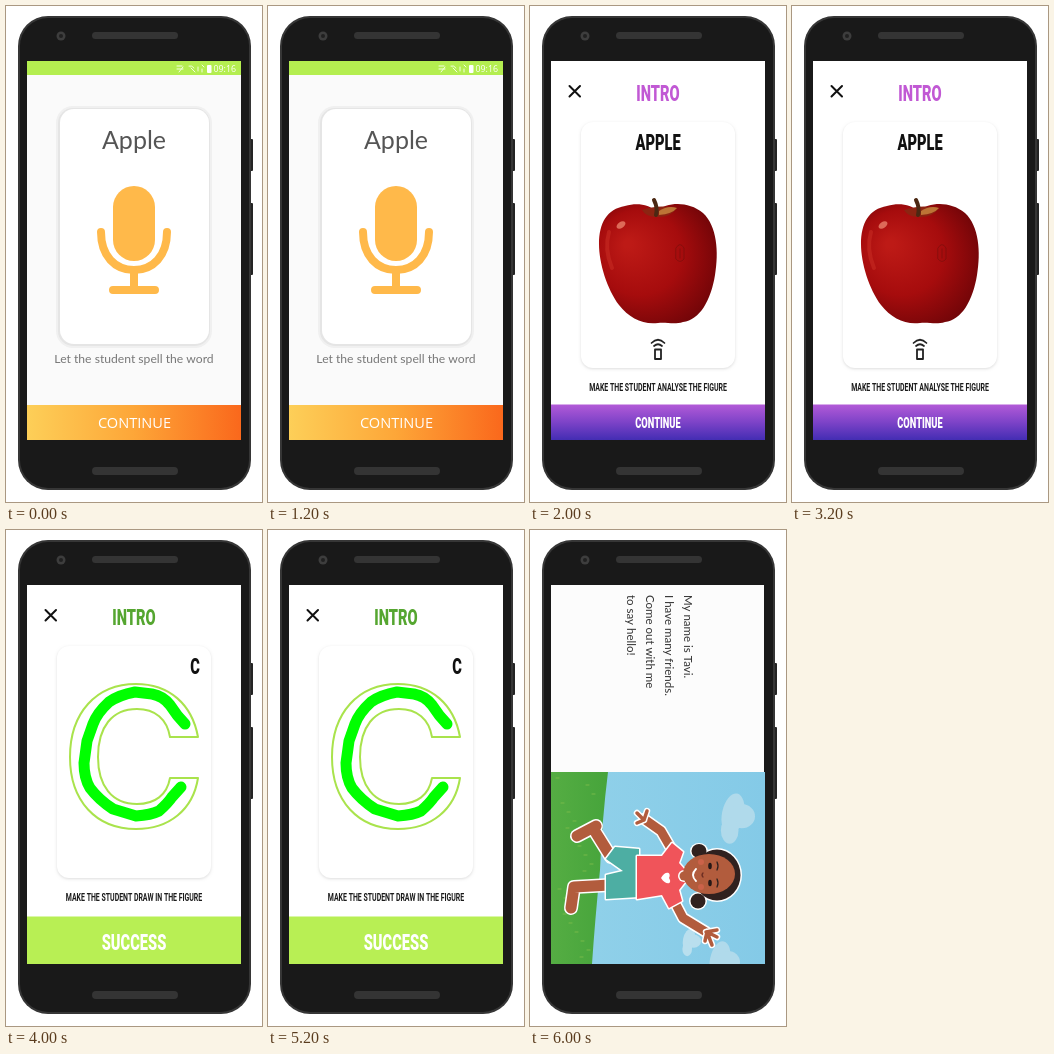
Animation, 256 px wide and 496 px high, one loop 8 s. Source, as an HTML page with a canvas:

```html
<!DOCTYPE html>
<html lang="en">
<head>
<meta charset="utf-8">
<title>Learning app screens</title>
<style>
html, body { margin: 0; width: 100%; height: 100%; overflow: hidden; background: #fff; }
canvas { display: block; width: 256px; height: 496px; }
</style>
</head>
<body>
<canvas id="stage" width="256" height="496"></canvas>
<script>
const c = document.getElementById('stage').getContext('2d');
const SANS = 'Lato, "Open Sans", sans-serif';
const CONDENSE = 0.65; // narrow poster lettering
const SKIN = '#b25c3d', HAIR = '#30211f';

function box(x, y, w, h, fill, r = 0) {
  c.beginPath();
  c.roundRect(x, y, w, h, r);
  c.fillStyle = fill;
  c.fill();
}

function oval(x, y, rx, ry, fill, turn = 0) {
  c.beginPath();
  c.ellipse(x, y, rx, ry, turn, 0, 7);
  c.fillStyle = fill;
  c.fill();
}

function line(d, color, width) {
  c.strokeStyle = color;
  c.lineWidth = width;
  c.lineCap = c.lineJoin = 'round';
  c.stroke(new Path2D(d));
}

function shape(d, fill, edge) {
  if (edge) line(d, edge, 3);
  c.fillStyle = fill;
  c.fill(new Path2D(d));
}

function text(s, x, y, font, color, align = 'center') {
  c.font = font;
  c.fillStyle = color;
  c.textAlign = align;
  c.fillText(s, x, y);
}

function poster(s, x, y, size, color, weight = 900) {
  c.save();
  c.translate(x, y);
  c.scale(CONDENSE, 1);
  text(s, 0, 0, `${weight} ${size}px Roboto, sans-serif`, color);
  c.restore();
}

function blend(x0, y0, x1, y1, ...colors) {
  const g = c.createLinearGradient(x0, y0, x1, y1);
  colors.forEach((k, i) => g.addColorStop(i / (colors.length - 1), k));
  return g;
}

function card(x, y, w, h, r) {
  c.save();
  c.shadowColor = '#0002';
  c.shadowBlur = 3;
  c.shadowOffsetY = 1;
  box(x, y, w, h, '#fff', r);
  c.restore();
}

function phone() {
  box(243, 133, 4, 32, '#242424', 1);
  box(243, 197, 4, 72, '#242424', 1);
  box(12, 10, 233, 474, '#363636', 30);
  box(14, 12, 229, 470, '#191919', 28);
  box(86, 26, 86, 7, '#343434', 3.5);
  box(86, 461, 86, 8, '#343434', 4);
  oval(55, 30, 4.5, 4.5, '#3d3d3d');
  oval(55, 30, 2, 2, '#202020');
}

function spell() {
  box(21, 55, 214, 379, '#fafafa');
  box(21, 55, 214, 14, '#b4ee50');
  text('09:16', 230, 66, '8.8px "Open Sans", sans-serif', '#fff', 'right');
  box(201, 59, 4.5, 8, '#fff', 1);
  line('M171 60h5M171 63h6M173 66l4 -5M183 60q3 -1 5 2M185 62l4 4M192 61v4M196 59l2 2M196 66v-3', '#f3ffe0', 1);

  box(50, 100, 156, 242, '#f0f0f0', 17);
  box(52, 102, 152, 238, '#e5e5e5', 15);
  box(54, 103, 149, 235, '#fff', 14);
  text('Apple', 128, 143, '25px ' + SANS, '#555');
  const amber = '#ffb94a';
  box(107, 180, 42, 75, amber, 21);
  line('M95 226C95 250 109 264 128 264S161 250 161 226', amber, 8);
  line('M128 266V283M107 284H149', amber, 8);
  text('Let the student spell the word', 128, 357, '12.15px ' + SANS, '#777');
  box(21, 399, 214, 35, blend(21, 0, 235, 0, '#fdcf58', '#fda638', '#fa681c'));
  text('CONTINUE', 128.5, 422, '14.6px "Open Sans", sans-serif', '#fff');
}

function lesson(title, h, caption, captionY) {
  box(21, 55, 214, 379, '#fff');
  line('M39.5 80L50 90.5M50 80L39.5 90.5', '#111', 2);
  poster('INTRO', 128, 94.5, 22.5, title);
  card(51, 116, 154, h, 12);
  poster(caption, 128, captionY, 10.7, '#1c1c1c', 600);
}

function apple() {
  const skin = c.createRadialGradient(98, 238, 4, 118, 254, 74);
  skin.addColorStop(0, '#bd1a16');
  skin.addColorStop(0.55, '#a60c0d');
  skin.addColorStop(1, '#720508');
  shape('M126 205C138 196 158 195 173 207C187 220 189 246 185 269C181 294 170 314 153 316C144 319 137 316 128 317C113 319 99 312 89 299C77 283 69 257 69 238C69 217 77 203 95 200C108 196 119 199 126 205Z', skin);
  shape('M112 204Q128 198 147 202Q140 212 126 211Q116 211 112 204Z', '#8c2412');
  shape('M129 205Q138 199 147 202Q142 208 129 209Z', '#bd7436');
  line('M126 209Q128 202 124 194', '#4b2813', 4);
  oval(91, 219, 5, 3, '#dd6a58', -0.6);
  line('M79 226Q74 243 82 262', '#cc33287a', 4);
  line('M146 242Q150 235 154 242V253Q150 258 146 253ZM150 243V252', '#65100c77', 1);
}

function picture() {
  lesson(blend(107, 0, 149, 0, '#c159d4', '#a44cd5'), 246, 'MAKE THE STUDENT ANALYSE THE FIGURE', 384.5);
  poster('APPLE', 128, 144, 22.5, '#111');
  apple();
  line('M125 343.5H131V353H125Z', '#222', 1.8);
  line('M121.5 337Q128 330.5 134.5 337M124 340Q128 336.5 132 340', '#222', 1.7);
  box(21, 398.5, 214, 35.5, blend(0, 398, 0, 434, '#b45bd8', '#7e43c8', '#432db3'));
  poster('CONTINUE', 128, 422, 14.3, '#fff');
}

function trace() {
  lesson('#55a630', 232, 'MAKE THE STUDENT DRAW IN THE FIGURE', 370.5);
  poster('C', 189, 144, 22.5, '#111');
  line('M192 207C186 174 163 154 130 154C90 154 64 183 64 227C64 271 90 299 130 299C163 299 187 280 192 248H164C161 265 149 274 131 274C106 274 92 256 92 227C92 197 106 179 131 179C149 179 161 189 164 207Z', '#a9e34c', 2);
  line('M179 194Q171 186 164 175Q157 166 146 164L129 162Q113 165 103 172Q91 183 87 194L81 211L78 233Q78 248 84 258Q93 270 107 279L130 286Q145 285 153 281Q162 273 166 267L175 257', '#0f0', 11);
  box(21, 386.5, 214, 47.5, '#b8ef54');
  poster('SUCCESS', 128, 419.5, 22.5, '#fff');
}

function cloud(x, y, s, fill) {
  oval(x, y, 10 * s, 19 * s, fill, 0.2);
  oval(x + 8 * s, y + 2 * s, 12 * s, 11 * s, fill);
  oval(x - 3 * s, y + 15 * s, 8 * s, 12 * s, fill);
}

function limb(d, width) {
  line(d, '#fff', width + 3);
  line(d, SKIN, width);
}

function child() {
  limb('M81 327L66 303M66 296L47 306', 11);
  limb('M80 355L44 357L41 378', 11);
  limb('M146 327L131 301L114 289', 9);
  limb('M114 290L107 283M114 290L117 281M114 290L107 293', 3.5);
  limb('M141 365L153 388L176 402', 9);
  limb('M176 402L187 400M177 402L187 407M177 402L182 415M177 402L175 411', 3.5);

  shape('M109 319L85 317L76 329L93 341L76 345V369L109 367Z', '#4daea3', '#fff');
  shape('M107 326L132 326L142 313L153 322L149 333L156 341V351L149 360L152 371L139 378L132 365L107 369Z', '#f0545a', '#fff');
  shape('M131 348C135 340 142 342 139 348C143 354 136 356 131 348Z', '#fff');

  limb('M154 346H165', 9);
  oval(169, 321, 9, 8, '#fff');
  oval(168, 371, 9, 9, '#fff');
  oval(187, 345, 25, 27, '#fff');
  oval(187, 345, 23.5, 25.5, HAIR);
  oval(169, 321, 7.5, 7, HAIR);
  oval(168, 371, 7.5, 7.5, HAIR);
  oval(179, 344, 26, 20, SKIN);
  oval(180, 336, 1.8, 3.2, '#251817');
  oval(180, 353, 1.8, 3.2, '#251817');
  line('M187 332Q189 336 187 340M187 349Q189 353 187 357', HAIR, 1.3);
  line('M173 343Q171 345 173 347', '#6c2d23', 1.3);
  line('M166 339Q160 345 166 351', '#fff', 1.8);
  oval(171, 332, 3, 3, '#cb6249');
  oval(171, 357, 3, 3, '#cb6249');
}

function story() {
  box(21, 55, 213, 379, '#fcfcfc');
  ['My name is Tavi.', 'I have many friends.', 'Come out with me', 'to say hello!'].forEach((s, i) => {
    c.save();
    c.translate(154 - i * 19, 65);
    c.rotate(Math.PI / 2);
    text(s, 0, 0, '11.5px ' + SANS, '#333', 'left');
    c.restore();
  });
  c.save();
  c.beginPath();
  c.rect(21, 242, 214, 192);
  c.clip();
  box(21, 242, 214, 192, blend(65, 0, 235, 0, '#8fd0e9', '#84cae7'));
  cloud(203, 284, 1.1, '#b0daeb');
  cloud(190, 430, 1, '#b0daeb');
  cloud(159, 410, 0.6, '#b9dfee');
  shape('M21 242H78Q72 290 70 340Q65 390 62 434H21Z', blend(21, 0, 78, 0, '#55ad43', '#46a43b'));
  for (let i = 0; i < 22; i++) {
    line(`M${26 + i * 17 % 37} ${248 + i * 43 % 181}h3`, '#76b949', 1);
  }
  child();
  c.restore();
}

const scenes = [spell, picture, trace, story];
const start = performance.now();

function draw(now) {
  const t = Math.max(0, now - start) % 8000;
  c.clearRect(0, 0, 256, 496);
  phone();
  scenes[Math.floor(t / 2000)]();
  requestAnimationFrame(draw);
}
draw(start);
</script>
</body>
</html>
```
